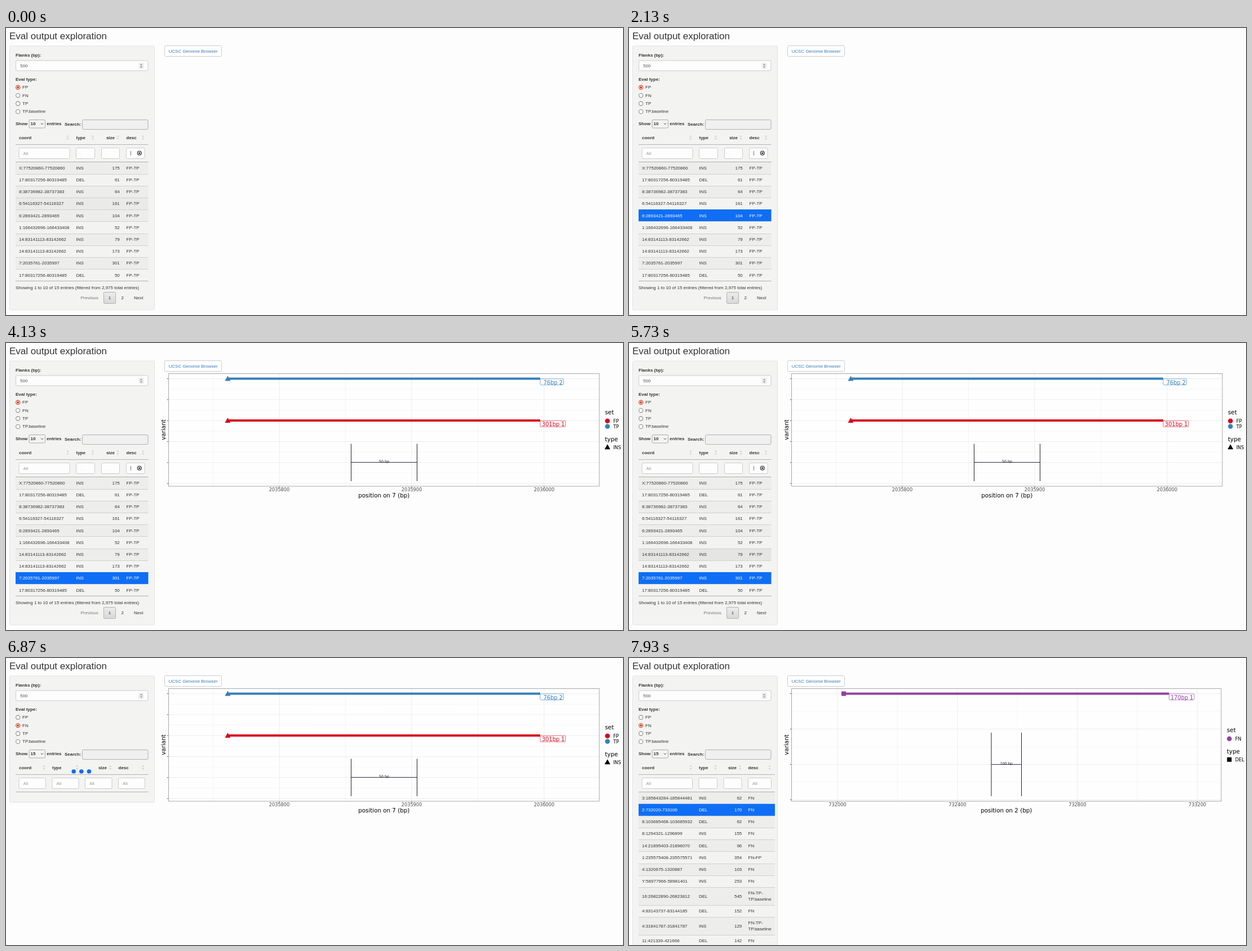
Recreate the animation shown at these times as an HTML page with a canvas. Size 1095 px wide and 511 px high, loop 8000 ms.

```html
<!DOCTYPE html>
<html lang="en">
<head>
<meta charset="utf-8">
<title>Eval output exploration</title>
<style>
  html, body { margin: 0; width: 100%; height: 100%; overflow: hidden; background: #fdfdfd; }
  canvas { display: block; }
</style>
</head>
<body>
<canvas id="stage" width="1095" height="511"></canvas>
<script>
const ctx = document.getElementById('stage').getContext('2d');
const LOOP = 8000, TICK = 1000 / 15;
const SANS = '"Liberation Sans", Arial, sans-serif';
const PLOT = '"DejaVu Sans", sans-serif';
const INK = '#333', RED = '#d7061f', BLUE = '#3580ba', PURPLE = '#9340a0', ACTIVE = '#0f6ef5';

// ---- drawing helpers ----
function text(str, x, y, { size = 8, color = INK, bold = false, align = 'left', family = SANS } = {}) {
  ctx.font = `${bold ? 'bold ' : ''}${size}px ${family}`;
  ctx.fillStyle = color;
  ctx.textAlign = align;
  ctx.fillText(str, x, y);
}
const bold = (str, x, y, align) => text(str, x, y, { bold: true, align });
const plotText = (str, x, y, size, color = '#000', align = 'left') =>
  text(str, x, y, { size, color, align, family: PLOT });

function line(x1, y1, x2, y2, color, width = 1) {
  ctx.strokeStyle = color;
  ctx.lineWidth = width;
  ctx.beginPath();
  ctx.moveTo(x1, y1);
  ctx.lineTo(x2, y2);
  ctx.stroke();
}

function box(x1, y1, x2, y2, fill, stroke, radius = 2) {
  ctx.beginPath();
  ctx.roundRect(x1, y1, x2 - x1, y2 - y1, radius);
  if (fill) { ctx.fillStyle = fill; ctx.fill(); }
  if (stroke) { ctx.strokeStyle = stroke; ctx.lineWidth = 1; ctx.stroke(); }
}

function disc(x, y, r, color) {
  ctx.fillStyle = color;
  ctx.beginPath();
  ctx.arc(x, y, r, 0, Math.PI * 2);
  ctx.fill();
}

function ring(x, y, r, color, width = 1) {
  ctx.strokeStyle = color;
  ctx.lineWidth = width;
  ctx.beginPath();
  ctx.arc(x, y, r, 0, Math.PI * 2);
  ctx.stroke();
}

// Triangle pointing up for positive h, down for negative h.
function triangle(x, y, w, h, color) {
  ctx.fillStyle = color;
  ctx.beginPath();
  ctx.moveTo(x, y - h / 2);
  ctx.lineTo(x + w / 2, y + h / 2);
  ctx.lineTo(x - w / 2, y + h / 2);
  ctx.fill();
}

function marker(shape, x, y, color) {
  if (shape === 'INS') triangle(x, y - 0.5, 10, 9, color);
  else { ctx.fillStyle = color; ctx.fillRect(x - 4, y - 4, 8, 8); }
}

// ---- tables ----
const parse = list => list.trim().split('\n').map(row => row.trim().split(' '));

const fpTable = {
  length: 10, right: 252.5, radio: 0, bottom: 502,
  inputs: [[23, 113], [124.5, 157.5], [169.5, 201.5], [213.5, 246]],
  sizeHead: 193, icons: [109.5, 154, 198.5, 243], hints: [0],
  rows: parse(`
    X:77520860-77520860 INS 175 FP-TP
    17:80317256-80319485 DEL 61 FP-TP
    8:38736982-38737383 INS 64 FP-TP
    6:54116327-54116327 INS 161 FP-TP
    6:2893421-2893465 INS 104 FP-TP
    1:166432696-166433408 INS 52 FP-TP
    14:83141113-83142662 INS 79 FP-TP
    14:83141113-83142662 INS 173 FP-TP
    7:2035761-2035997 INS 301 FP-TP
    17:80317256-80319485 DEL 50 FP-TP`)
};
const emptyTable = {
  length: 15, right: 252.5, radio: 1, bottom: 257,
  inputs: [[23, 70.5], [82, 129], [140.5, 188], [199.5, 246.5]],
  sizeHead: 179, icons: [67.5, 126, 185, 243], hints: [0, 1, 2, 3], rows: []
};
const fnTable = {
  length: 15, right: 259, radio: 1, bottom: 530,
  inputs: [[23, 112.5], [124, 156.5], [168, 200], [211.5, 252.5]],
  sizeHead: 191, icons: [109.5, 153.5, 197, 249.5], hints: [0, 3],
  rows: parse(`
    3:185843284-185844481 INS 62 FN
    2:732020-733106 DEL 170 FN
    8:103685468-103685932 DEL 62 FN
    8:1294321-1296899 INS 155 FN
    14:21895403-21896070 DEL 96 FN
    1:235575408-235575571 INS 354 FN-FP
    4:1320675-1320887 INS 103 FN
    Y:58977966-58981401 INS 253 FN
    16:26822890-26823812 DEL 545 FN-TP-|TP.baseline
    4:83143737-83144185 DEL 152 FN
    4:31841787-31841787 INS 129 FN-TP-|TP.baseline
    11:421339-421666 DEL 142 FN`)
};

function drawHeader(table) {
  const cols = table.inputs.map(([x]) => x);
  bold('coord', cols[0], 198);
  bold('type', cols[1], 198);
  bold('size', table.sizeHead, 198, 'right');
  bold('desc', cols[3], 198);
  for (const x of table.icons) {
    triangle(x, 192.3, 4, 3, '#cfcfd6');
    triangle(x, 197.5, 4, -3, '#cfcfd6');
  }
  line(17, 207.5, table.right, 207.5, '#b4b4bb');
  table.inputs.forEach(([x1, x2], i) => {
    box(x1, 213.5, x2, 232.5, '#fdfdfd', '#ccc');
    if (table.hints.includes(i)) text('All', x1 + 7.5, 225.5, { color: '#999' });
    else if (table === fpTable && i < 3) text('.', x1 + 7.5, 225.5, { color: '#bbb' });
  });
  if (table === fpTable) {
    line(221.5, 219, 221.5, 227, '#777');
    ring(236.8, 222.8, 3.5, '#222', 1.1);
    line(235.3, 221.3, 238.3, 224.3, '#222', 1.2);
    line(238.3, 221.3, 235.3, 224.3, '#222', 1.2);
  }
  line(17, 238.5, table.right, 238.5, '#b0b0b6');
}

function drawRows(table, selected, hover) {
  const [c0, c1, c2, c3] = table.inputs;
  let y = 238.5;
  table.rows.forEach(([coord, type, size, desc], i) => {
    const lines = desc.split('|');
    const h = lines.length > 1 ? 31.9 : 21.2;
    const mid = y + h / 2 + 2.6;
    const shade = (i % 2 ? 0 : 0.025) + (i === hover ? 0.035 : 0);
    ctx.fillStyle = i === selected ? ACTIVE : `rgba(0,0,0,${shade})`;
    ctx.fillRect(17, y, table.right - 17, h);
    if (i) line(17, Math.round(y) + 0.5, table.right, Math.round(y) + 0.5, i === selected ? ACTIVE : '#d0d0d2');
    const color = i === selected ? '#fff' : INK;
    text(coord, c0[0], mid, { color });
    text(type, c1[0], mid, { color });
    text(size, c2[1] + 0.3, mid, { color, align: 'right' });
    lines.forEach((part, k) =>
      text(part, c3[0], mid + (k - (lines.length - 1) / 2) * 11.2, { color }));
    y += h;
  });
}

function drawFooter() {
  line(17, 450.5, 252.5, 450.5, '#b0b0b6');
  text('Showing 1 to 10 of 15 entries (filtered from 2,975 total entries)', 17, 464.5);
  text('Previous', 132.5, 483, { color: '#777' });
  const shade = ctx.createLinearGradient(0, 470, 0, 491);
  shade.addColorStop(0, '#ececec');
  shade.addColorStop(1, '#d8d8d8');
  box(173.5, 470.5, 194.5, 490.5, shade, '#b2b2b2', 1);
  text('1', 184, 483, { align: 'center' });
  text('2', 206.7, 483, { align: 'center' });
  text('Next', 227, 483);
}

// Three dots slide right while one grows in and one shrinks away.
function drawProcessing(elapsed) {
  const x = Math.floor(elapsed / TICK + 0.01) * TICK / 600 % 1;
  const s = 0.5 - Math.sin(Math.asin(1 - 2 * x) / 3);
  const p = 3 * (1 - s) ** 2 * s + s ** 3;
  const step = 13.6, left = 120.2, r = 3.8;
  disc(left, 202, r * p, ACTIVE);
  disc(left + step * p, 202, r, ACTIVE);
  disc(left + step * (1 + p), 202, r, ACTIVE);
  disc(left + step * 2, 202, r * (1 - p), ACTIVE);
}

function drawSidebar(table, radio, selected, hover) {
  box(6.5, 32, 263.5, table.bottom, '#f3f3f2', '#e3e3e3');
  bold('Flanks (bp):', 17, 51);
  box(17.5, 58, 252, 76, '#fdfdfd', '#ccc');
  text('500', 25, 69.5, { color: '#555' });
  box(235.5, 62, 244.5, 72.5, '#ececec', null, 1);
  triangle(240, 65, 4, 2.5, '#888');
  triangle(240, 69.7, 4, -2.5, '#888');

  bold('Eval type:', 17, 93.5);
  ['FP', 'FN', 'TP', 'TP.baseline'].forEach((label, i) => {
    const y = 105.7 + i * 14.4;
    const on = i === radio;
    disc(21.2, y, 3.8, '#fdfdfd');
    ring(21.2, y, 3.6, on ? '#d6361f' : '#888', 1.1);
    if (on) disc(21.2, y, 2, '#d6361f');
    text(label, 29, y + 2.4);
  });

  bold('Show', 17, 173);
  box(41, 163.5, 69.5, 178, '#f3f3f2', '#aaa');
  bold(table.length, 43.5, 173);
  ctx.strokeStyle = INK;
  ctx.lineWidth = 1;
  ctx.beginPath();
  ctx.moveTo(62, 169.7);
  ctx.lineTo(64, 171.7);
  ctx.lineTo(66, 169.7);
  ctx.stroke();
  bold('entries', 72.3, 173);
  bold('Search:', 104, 174);
  box(135.5, 163.5, 252, 180.5, '#f0f0f0', '#b0b0b0');

  drawHeader(table);
  drawRows(table, selected, hover);
  if (table === fpTable) drawFooter();
}

// ---- plots ----
const pair = (from, to) => ({
  right: 1053, rowGap: 37.35, bottom: 246, legendX: 1063, shape: 'INS', from, to,
  sets: [['FP', RED], ['TP', BLUE]], setY: 127, typeY: 174.5
});
const plots = {
  chr6: {
    ...pair(523.5, 818), title: 'position on 6 (bp)',
    firstTick: 450, tickGap: 200.7, ticks: ['2893410', '2893440', '2893470', '2893500'],
    variants: [[63.5, BLUE, '64bp 1', 41], [138, RED, '104bp 1', 45]],
    scale: [503.5, 838, 179.5, 212.5, '50 bp']
  },
  chr7: {
    ...pair(393.5, 948), title: 'position on 7 (bp)',
    firstTick: 485, tickGap: 235, ticks: ['2035800', '2035900', '2036000'],
    variants: [[63.5, BLUE, '76bp 2', 41.5], [138, RED, '301bp 1', 45]],
    scale: [612.5, 729.5, 179.5, 212.5, '50 bp']
  },
  chr2: {
    right: 1051, rowGap: 63, bottom: 246, legendX: 1061, shape: 'DEL', from: 381, to: 958.5,
    sets: [['FN', PURPLE]], setY: 132, typeY: 170, title: 'position on 2 (bp)',
    firstTick: 370, tickGap: 212.9, ticks: ['732000', '732400', '732800', '733200'],
    variants: [[63.5, PURPLE, '170bp 1', 44.5]],
    scale: [643, 696.5, 133, 189.5, '100 bp']
  }
};

function drawPlot(p) {
  const left = 288.5, top = 54.5, floor = 255;
  const midX = (left + p.right) / 2;
  ctx.fillStyle = '#fefefe';
  ctx.fillRect(left, top, p.right - left, floor - top);
  for (let i = -1; i < 2 * p.ticks.length; i++) {
    const x = p.firstTick + i * p.tickGap / 2;
    if (x > left && x < p.right) line(x, top, x, floor, '#ededed', i % 2 ? 0.5 : 1);
  }
  for (let i = 0; ; i++) {
    const y = 63.5 + i * p.rowGap / 2;
    if (y > floor) break;
    line(left, y, p.right, y, '#ededed', i % 2 ? 0.5 : 1);
    if (i % 2 === 0) line(left - 2.5, y, left, y, '#555');
  }
  p.ticks.forEach((label, i) => {
    const x = p.firstTick + i * p.tickGap;
    line(x, floor, x, floor + 2.5, '#777');
    plotText(label, x, 264.2, 8.2, '#4d4d4d', 'center');
  });
  ctx.strokeStyle = '#a8a8a8';
  ctx.lineWidth = 1;
  ctx.strokeRect(left, top, p.right - left, floor - top);

  const [x1, x2, y1, yMid, label] = p.scale;
  line(x1, y1, x1, p.bottom, '#222');
  line(x2, y1, x2, p.bottom, '#222');
  line(x1, yMid, x2, yMid, '#3a2a4a');
  plotText(label, (x1 + x2) / 2, yMid + 0.3, 6.3, '#111', 'center');

  for (const [y, color, name, width] of p.variants) {
    line(p.from, y, p.to, y, color, 3.8);
    marker(p.shape, p.from, y, color);
    ctx.globalAlpha = 0.6;
    box(p.to, y + 0.2, p.to + width, y + 11.2, '#fefefe', color, 1.5);
    ctx.globalAlpha = 1;
    plotText(name, p.to + width - 1.5, y + 10, 9.8, color, 'right');
  }

  plotText(p.title, midX, 275, 10.3, '#000', 'center');
  ctx.save();
  ctx.translate(283, 154.5);
  ctx.rotate(-Math.PI / 2);
  plotText('variant', 0, 0, 10.4, '#000', 'center');
  ctx.restore();

  const lx = p.legendX;
  plotText('set', lx, p.setY, 10.3);
  p.sets.forEach(([name, color], i) => {
    const y = p.setY + 11.8 + i * 9.7;
    disc(lx + 4.4, y, 4.3, color);
    plotText(name, lx + 14.7, y + 3.2, 8.2);
  });
  plotText('type', lx, p.typeY, 10.3);
  marker(p.shape, lx + 4.4, p.typeY + 10.8, '#000');
  plotText(p.shape, lx + 14.7, p.typeY + 14.2, 8.2);
}

// ---- timeline ----
const CLICK_1 = 1866, PLOT_1 = 2200, CLICK_2 = 3266, PLOT_2 = 3600;
const RADIO = 6466, RELOAD = 6866, FILLED = 7133, CLICK_3 = 7600, PLOT_3 = 7866;

const at = (t, steps) => steps.reduce((value, [time, next]) => (t >= time ? next : value), null);

function hoverAt(t) {
  if (t < 1130) return 3;
  if (t < 2930) return 4;
  if (t < 5730) return Math.min(8, 4 + Math.floor((t - 2930) / TICK));
  if (t < 5930) return 8 - 2 * Math.floor((t - 5730) / TICK + 1);
  return t < 7266 ? -1 : 1;
}

function render(t) {
  ctx.fillStyle = '#fdfdfd';
  ctx.fillRect(0, 0, 1095, 511);
  text('Eval output exploration', 6, 20, { size: 17 });

  const table = at(t, [[0, fpTable], [RELOAD, emptyTable], [FILLED, fnTable]]);
  const selected = at(t, [[0, -1], [CLICK_1, 4], [CLICK_2, 8], [RELOAD, -1], [CLICK_3, 1]]);
  drawSidebar(table, t < RADIO ? 0 : 1, selected, hoverAt(t));
  if (table === emptyTable) drawProcessing(t - RELOAD);

  box(281.5, 31.5, 382.5, 50.5, '#fefefe', '#ccc');
  text('UCSC Genome Browser', 288.5, 43.8, { color: '#337ab7' });
  const plot = at(t, [[PLOT_1, plots.chr6], [PLOT_2, plots.chr7], [PLOT_3, plots.chr2]]);
  if (plot) drawPlot(plot);
}

const start = performance.now();
function frame() {
  render((performance.now() - start) % LOOP);
  requestAnimationFrame(frame);
}
frame();
</script>
</body>
</html>
```
